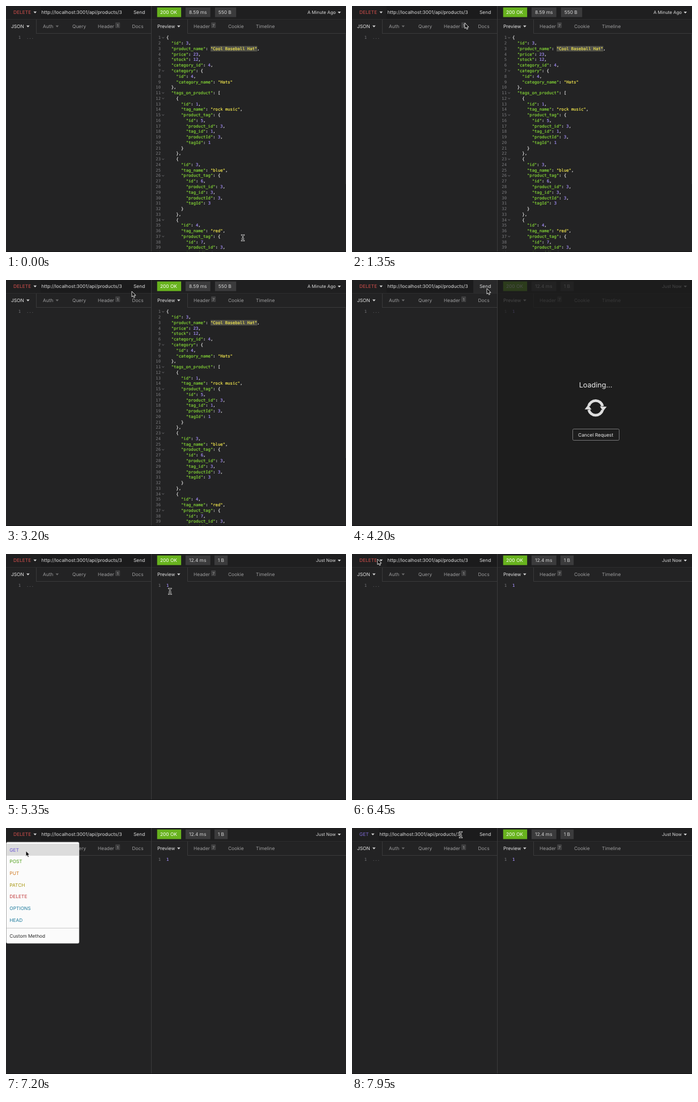
An HTML page that plays this animation: 600 by 435 pixels, repeating every 8000 ms.

```html
<!DOCTYPE html>
<html lang="en">
<head>
<meta charset="utf-8">
<title>API client</title>
<style>
  html, body { margin: 0; width: 100%; height: 100%; overflow: hidden; background: #232324; }
  svg { display: block; width: 600px; height: 435px; }
  text { font: 8.35px Inter, "Open Sans", sans-serif; white-space: pre; text-rendering: geometricPrecision; }
  .code { font: 7.2px "DejaVu Sans Mono", "Liberation Mono", monospace; }
  .code tspan { stroke-width: 0.2px; }
</style>
</head>
<body>
<svg id="stage" viewBox="0 0 600 435"></svg>
<script>
const LOOP = 8000;
const CHAR = 4.334, ROW = 9.763, BAR = 11;
const EDGE = '#3a3a3b', DIM = '#9b9b9c', LIT = '#e6e6e6';
const stage = document.getElementById('stage');

function add(parent, tag, attrs, content) {
  const node = document.createElementNS('http://www.w3.org/2000/svg', tag);
  for (const key in attrs) node.setAttribute(key, attrs[key]);
  if (content !== undefined) node.textContent = content;
  parent.append(node);
  return node;
}
const group = (parent = stage) => add(parent, 'g', {});
const box = (p, x, y, width, height, fill, more) =>
  add(p, 'rect', { x, y, width, height, fill, ...more });
const label = (p, x, mid, str, fill, more) =>
  add(p, 'text', { x, y: mid + 3, fill, ...more }, str);
const mono = (p, x, mid, str, fill, more) =>
  add(p, 'text', { x, y: mid + 2.4, fill, class: 'code', ...more }, str);
const caret = (p, x, mid, fill = '#d8d8d8') =>
  add(p, 'path', { d: `M${x} ${mid - 1.5}h5.6l-2.8 3.2z`, fill });
const badge = (p, x, width, fill) => box(p, x, 2.6, width, 17, fill);
const show = (node, on) => node.setAttribute('visibility', on ? 'visible' : 'hidden');

// Panes
box(stage, 0, 0, 600, 435, '#232324');
box(stage, 0, 0, 256, 23, '#1b1b1c');
box(stage, 257, 0, 343, 23, '#1f1f20');
const methodBg = box(stage, 0, 0, 61, 23, '#1f1f20');
const sendBg = box(stage, 214, 0, 42, 23, '#29292a');
box(stage, 0, 23, 600, 1, '#2d2d2e');

function tabs(items, edge, end) {
  for (const [x, name, fill, mark] of items) {
    label(stage, x, 36, name, fill);
    if (mark) {
      box(stage, mark[0], 29, 8.2, 10, '#3f3f40', { rx: 1 });
      label(stage, mark[0] + 4.1, 33.6, mark[1], '#aaa', { 'text-anchor': 'middle', style: 'font-size:6.6px' });
    }
  }
  box(stage, edge, 24, 1, 25, EDGE);
  box(stage, edge, 48, end - edge, 1, EDGE);
}
tabs([[9, 'JSON', LIT], [65, 'Auth', DIM], [117, 'Query', DIM],
      [162, 'Header', DIM, [193, '1']], [222.5, 'Docs', DIM]], 53, 256);
tabs([[267, 'Preview', LIT], [331, 'Header', DIM, [362, '7']],
      [392, 'Cookie', DIM], [441, 'Timeline', DIM]], 320, 600);
caret(stage, 36, 36);
caret(stage, 87.5, 36, '#6c6c6d');
caret(stage, 302, 36);

const method = label(stage, 13, BAR, '', '');
const methodCaret = caret(stage, 0, 11.3);
const url = label(stage, 63, BAR, 'http://localhost:3001/api/products/3', '#dcdcdc');
label(stage, 225, BAR, 'Send', '#dcdcdc');
mono(stage, 26, 56, '1', '#77777a', { 'text-anchor': 'end' });
mono(stage, 36, 56, '...', '#69696b');

// Response
badge(stage, 266.7, 42.4, '#68b31e');
label(stage, 272, BAR, '200 OK', '#fff', { 'font-weight': 600 });
caret(stage, 585.4, 11.5);

function response(time, size, sizeX, sizeW, age) {
  const g = group();
  badge(g, 316.8, 43.8, '#3b3b3c');
  label(g, 323, BAR, time, '#d4d4d4');
  badge(g, sizeX, sizeW, '#3b3b3c');
  label(g, sizeX + 6, BAR, size, '#d4d4d4');
  label(g, 582, BAR, age, '#dcdcdc', { 'text-anchor': 'end', style: 'font-size:7.85px' });
  return g;
}

const tag = (id, tag_name, link) => ({
  id, tag_name,
  product_tag: { id: link, product_id: 3, tag_id: id, productId: 3, tagId: id }
});
const product = {
  id: 3, product_name: 'Cool Baseball Hat', price: 23, stock: 12, category_id: 4,
  category: { id: 4, category_name: 'Hats' },
  tags_on_product: [tag(1, 'rock music', 5), tag(3, 'blue', 6), tag(4, 'red', 7)]
};

function tokenColor(token, rest) {
  if (token[0] === '"') return rest[0] === ':' ? '#83d436' : '#f2e64e';
  return /\d/.test(token) ? '#a48ff8' : '#e6e6e6';
}
function printCode(g, source) {
  source.split('\n').slice(0, 40).forEach((line, i) => {
    const mid = 56 + i * ROW;
    const body = line.trimStart();
    const x = 283 + (line.length - body.length) * CHAR;
    mono(g, 273, mid, i + 1, '#7c7c7f', { 'text-anchor': 'end' });
    if (/[{[]$/.test(line))
      add(g, 'path', { d: `M275.3 ${mid - 0.8}l1.9 1.7 1.9-1.7`, fill: 'none', stroke: '#7c7c7f', 'stroke-width': 0.8 });
    if (body.includes('Cool')) box(g, x + 16 * CHAR, mid - 4.8, 19 * CHAR, 9.6, '#505049');
    const text = mono(g, x, mid, '', '');
    for (const m of body.matchAll(/"[^"]*"|\d+|[^"\d]+/g)) {
      const color = tokenColor(m[0], body.slice(m.index + m[0].length));
      add(text, 'tspan', { fill: color, stroke: color }, m[0]);
    }
  });
}
const before = response('8.59 ms', '550 B', 368.8, 37.4, 'A Minute Ago');
printCode(before, JSON.stringify(product, null, 2));
box(before, 599, 50, 1, 265, '#333334');
const after = response('12.4 ms', '1 B', 367.8, 23.4, 'Just Now');
printCode(after, '1');

// Loading overlay
const loading = group();
box(loading, 257, 0, 343, 435, '#1b1b1c', { opacity: 0.78 });
const centered = { 'text-anchor': 'middle' };
label(loading, 430, 187.3, 'Loading...', '#ececec', { ...centered, style: 'font-size:12.6px' });
const spinner = group(loading);
for (const turn of [0, 180]) {
  const half = add(spinner, 'g', { transform: `rotate(${turn})` });
  add(half, 'path', { d: 'M-12.2 -3.6A12.6 12.6 0 0 1 12.2 -3.2', fill: 'none', stroke: '#dedede', 'stroke-width': 4.8 });
  add(half, 'path', { d: 'M7.4 -2.8L19.4 -2.4 13.2 5.6z', fill: '#dedede' });
}
box(loading, 389.5, 263.5, 82, 20, 'none', { rx: 2, stroke: '#777778' });
label(loading, 430, 273.8, 'Cancel Request', '#ececec', centered);

box(stage, 256, 0, 1, 435, EDGE);
box(stage, 0, 434, 600, 1, '#141415');

// Method menu
const menu = group();
box(menu, 0.5, 25, 128.5, 179, '#fbfbfb', { rx: 2.5, stroke: '#bdbdbd', 'stroke-width': 0.6 });
const rowBg = box(menu, 0.8, 28, 128, 21, '#dcdcdc');
[['GET', '#6a56d2'], ['POST', '#4f9f1a'], ['PUT', '#cf7a22'], ['PATCH', '#a8960f'],
 ['DELETE', '#c03a3c'], ['OPTIONS', '#1c7a9c'], ['HEAD', '#1c7a9c']]
  .forEach(([name, fill], i) => label(menu, 6.3, 38.6 + i * 20.65, name, fill));
box(menu, 0.8, 176.6, 128, 1, '#c6c6c6');
label(menu, 6.3, 191, 'Custom Method', '#2a2a2a');

// Pointer
const arrow = add(stage, 'path', {
  d: 'M0 0V9.8L2.2 7.8 3.7 11.2 5.4 10.4 4 7.2H7Z',
  fill: '#0a0a0a', stroke: '#f2f2f2', 'stroke-width': 0.9
});
const beam = group();
for (const [stroke, width] of [['#f0f0f0', 2.2], ['#111', 0.9]])
  add(beam, 'path', {
    d: 'M-2.2 -5L0 -4.2 2.2 -5M0 -4.2V4.2M-2.2 5L0 4.2 2.2 5M-1.2 1.6H1.2',
    fill: 'none', stroke, 'stroke-width': width, 'stroke-linecap': 'round'
  });

// time, x, y
const path = [
  [0, 418, 410], [250, 418, 410], [1050, 205, 36], [1350, 199, 30], [1900, 199, 30],
  [2900, 221, 21], [3200, 222, 20], [3500, 224, 19], [3950, 238, 15], [4350, 238, 15],
  [4800, 285, 66], [5500, 290, 66], [6250, 47, 9], [6450, 45, 9], [6650, 45, 9],
  [6950, 35, 41], [7400, 35, 40], [7850, 191, 12], [7950, 192, 12], [LOOP, 192, 12]
];
function pointerAt(t) {
  const i = path.findIndex(p => p[0] > t);
  const [t0, x0, y0] = path[i - 1], [t1, x1, y1] = path[i];
  const u = (t - t0) / (t1 - t0), e = u * u * (3 - 2 * u);
  return [x0 + (x1 - x0) * e, y0 + (y1 - y0) * e];
}
const clamp = v => Math.max(0, Math.min(1, v));

function draw(t) {
  const [x, y] = pointerAt(t);
  const isGet = t >= 7400, menuOpen = t >= 6650 && !isGet;
  const edge = isGet ? 47 : 61;
  const fade = clamp((t - 4030) / 100) * clamp((4350 - t) / 50);

  method.textContent = isGet ? 'GET' : 'DELETE';
  method.setAttribute('fill', isGet ? '#7f6bd6' : '#d4504d');
  methodCaret.setAttribute('transform', `translate(${isGet ? 34 : 48.5})`);
  methodBg.setAttribute('width', edge);
  url.setAttribute('x', edge + 1.6);

  show(sendBg, x >= 214 && x < 256 && y < 18.5);
  show(before, t < 4150);
  show(after, t >= 4150);
  loading.setAttribute('opacity', fade);
  spinner.setAttribute('transform', `translate(430 226.3) rotate(${(t - 4200) * 0.18})`);
  show(menu, menuOpen);
  show(rowBg, menuOpen && y > 28);

  const overInput = x > edge && x < 214 && y < 23;
  const isBeam = !menuOpen && (overInput || y > 49);
  show(beam, isBeam);
  show(arrow, !isBeam);
  (isBeam ? beam : arrow).setAttribute('transform', `translate(${x} ${y})`);
}

const start = performance.now();
function frame() {
  draw((performance.now() - start) % LOOP);
  requestAnimationFrame(frame);
}
frame();
</script>
</body>
</html>
```
